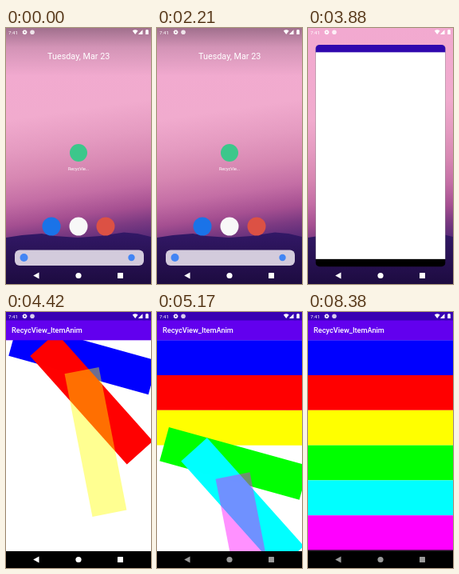
An HTML page for the animation above (8.64 s loop, 182 px wide and 320 px high).

```html
<!DOCTYPE html>
<html lang="en">
<head>
<meta charset="utf-8">
<title>List item animation</title>
<style>
html, body { margin: 0; width: 100%; height: 100%; overflow: hidden; background: #000; }
svg { display: block; width: 100%; height: 100%; }
text { font-family: Roboto, "Open Sans", sans-serif; fill: #fff; }
</style>
</head>
<body>
<svg viewBox="0 0 182 320">
  <defs>
    <linearGradient id="sky" gradientUnits="userSpaceOnUse" x1="71" y1="0" x2="111" y2="270">
      <stop offset="0" stop-color="#f2a9d0"/>
      <stop offset=".38" stop-color="#f1abce"/>
      <stop offset=".52" stop-color="#e59bc1"/>
      <stop offset=".65" stop-color="#d787b2"/>
      <stop offset=".76" stop-color="#c46ea5"/>
      <stop offset=".86" stop-color="#a54f91"/>
      <stop offset=".93" stop-color="#7c3a82"/>
      <stop offset="1" stop-color="#5a2b78"/>
    </linearGradient>
    <linearGradient id="hill" x2="0" y2="1">
      <stop offset="0" stop-color="#321866"/>
      <stop offset="1" stop-color="#1d0b40"/>
    </linearGradient>
    <linearGradient id="shade" x2="0" y2="1">
      <stop offset="0" stop-color="#302030" stop-opacity=".42"/>
      <stop offset=".4" stop-color="#302030" stop-opacity=".16"/>
      <stop offset="1" stop-color="#302030" stop-opacity="0"/>
    </linearGradient>
    <clipPath id="frame"><rect id="frameBox"/></clipPath>
    <clipPath id="listArea"><rect y="35" width="182" height="264"/></clipPath>
  </defs>

  <rect width="182" height="320" fill="url(#sky)"/>
  <path d="M0 262L20 259 45 257 62 260 90 262 118 260 148 255.5 165 257 182 261V320H0Z" fill="url(#hill)"/>

  <g id="home">
    <rect width="182" height="60" fill="url(#shade)"/>
    <text x="91.2" y="38.5" font-size="10.8" text-anchor="middle">Tuesday, Mar 23</text>
    <circle cx="91" cy="156" r="11" fill="#3cc78b"/>
    <text x="91" y="177.5" font-size="5.4" text-anchor="middle">RecycVie...</text>
    <circle cx="57" cy="248" r="11.5" fill="#1a73e8"/>
    <circle cx="91" cy="248" r="11.5" fill="#f8f8f8"/>
    <circle cx="125" cy="248" r="11.5" fill="#dc5144"/>
    <rect x="11" y="277.5" width="162" height="19.5" rx="6" fill="#d3cbdc"/>
    <circle cx="22.5" cy="287" r="5" fill="#4285f4"/>
    <circle cx="157.5" cy="287" r="4.2" fill="#4285f4"/>
  </g>

  <g id="splash" clip-path="url(#frame)">
    <g id="window">
      <rect width="182" height="330" fill="#000"/>
      <rect width="182" height="299" fill="#fff"/>
      <rect width="182" height="10.5" fill="#3008ae"/>
    </g>
  </g>

  <g id="app">
    <rect width="182" height="320" fill="#fff"/>
    <g id="list" clip-path="url(#listArea)"></g>
    <rect width="182" height="35.3" fill="#6200ee"/>
    <rect width="182" height="10.5" fill="#3700b3"/>
    <text x="7" y="26.3" font-size="9.2" font-weight="500">RecycView_ItemAnim</text>
    <rect y="299" width="182" height="21" fill="#000"/>
  </g>

  <g fill="#fff">
    <text x="3" y="7.8" font-size="6.2">7:41</text>
    <circle cx="23.5" cy="5.2" r="1.8" fill="none" stroke="#fff" stroke-width="1.5"/>
    <circle cx="23.5" cy="5.2" r="2.7" fill="none" stroke="#fff" stroke-width=".7" stroke-dasharray="1.06"/>
    <circle cx="33" cy="5.2" r="2.8" opacity=".8"/>
    <path d="M158.8 3.6Q162.2 .9 165.6 3.6L162.2 8ZM171.5 2.2V8H165.9ZM175.2 2.6H176.2V1.9H177.8V2.6H178.8V8H175.2Z"/>
  </g>
  <g id="nav" fill="#fff">
    <path d="M41.5 305.6V313.4L34.2 309.5Z"/>
    <circle cx="91" cy="309.5" r="3.6"/>
    <rect x="140" y="306" width="7" height="7" rx=".6"/>
  </g>
</svg>
<script>
const LOOP = 8640, LAUNCH = 3620, LAUNCH_TIME = 420, APP_SHOWN = 4090;
const FIRST_ITEM = 3693, STAGGER = 250, SPIN = 1000, FADE = 500;
const TOP = 35.2, ROW = 43.8;
const colors = ['#00f', '#f00', '#ff0', '#0f0', '#0ff', '#f0f', '#444449'];

const $ = id => document.getElementById(id);
const set = (el, attrs) => { for (const k in attrs) el.setAttribute(k, attrs[k]); };
const clamp = x => Math.min(1, Math.max(0, x));
const mix = (a, b, x) => a + (b - a) * x;
const easeOut = x => 1 - (1 - x) ** 2;
const easeInOut = x => (1 - Math.cos(Math.PI * x)) / 2;

const rows = colors.map((fill, i) => {
  const row = document.createElementNS('http://www.w3.org/2000/svg', 'rect');
  set(row, { y: TOP + i * ROW, width: 182, height: ROW, fill });
  if (i === 6) set(row, { stroke: '#000', 'stroke-width': 1 });
  $('list').append(row);
  return row;
});

function drawLaunch(t) {
  const x = clamp((t - LAUNCH) / LAUNCH_TIME), e = easeOut(x);
  const left = mix(66, 0, e), top = mix(146, 0, e), width = 182 - 2 * left;
  set($('home'), { opacity: 1 - clamp(x * 2.5), transform: `translate(0 ${-12 * e})` });
  set($('splash'), { opacity: clamp(x * 6) });
  set($('frameBox'), {
    x: left, y: top, width, height: mix(168, 320, e) - top,
    rx: x < 1 ? mix(11, 4, e) : 0
  });
  set($('window'), { transform: `translate(${left} ${top}) scale(${width / 182})` });
}

// Rows swing from upright to level around the middle of their bottom edge.
function drawRows(t) {
  const clock = t + Math.max(0, t - 5170) * .075;
  rows.forEach((row, i) => {
    const age = clock - FIRST_ITEM - i * STAGGER;
    const angle = 90 * (1 - easeInOut(clamp(age / SPIN)));
    set(row, {
      opacity: easeInOut(clamp(age / FADE)),
      transform: `rotate(${angle} 91 ${TOP + (i + 1) * ROW})`
    });
  });
}

function draw(now) {
  const t = now % LOOP;
  const inApp = t >= APP_SHOWN;
  drawLaunch(t);
  drawRows(t);
  set($('app'), { visibility: inApp ? 'visible' : 'hidden' });
  set($('nav'), { opacity: mix(1, .6, clamp((t - 4500) / 300)) });
}

const start = performance.now();
function tick() {
  draw(performance.now() - start);
  requestAnimationFrame(tick);
}
tick();
</script>
</body>
</html>
```
